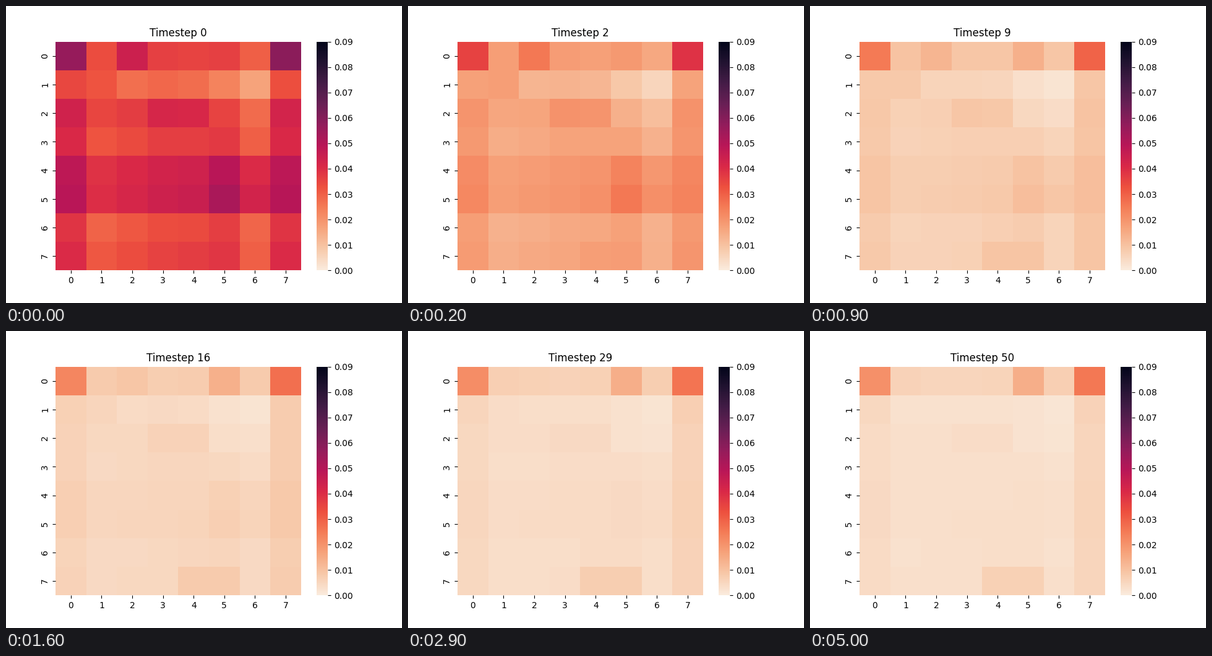
These frames come from a looping animation (640x480 px, 5100 ms). A matplotlib script:

```python
import numpy as np
import matplotlib.pyplot as plt
from matplotlib.animation import FuncAnimation
from matplotlib.colors import LinearSegmentedColormap

SIZE = 8
STEPS = 51
INTERVAL = 100
VMAX = 0.09

# Evenly spaced ramp: cream, orange, red, purple, near black
RAMP = ["#FAEBDD", "#F7C9AA", "#F6A47C", "#F47D57", "#ED503E", "#D92847",
        "#B91657", "#921C5B", "#691F55", "#451C47", "#221331", "#03051A"]

# Values are in thousandths: a level for each row, an offset for each column
ROW_LEVEL = [35.5, 28, 38.5, 36, 43, 44, 33.5, 35.5]
COL_OFFSET = [5, -4, -2, 0, 0, 1.5, -5.5, 5]

# Local bumps and dips: row, column, radius, first height, last height
SPOTS = [
    (0, 0, 0.6, 16, 14),
    (0, 2, 0.6, 11, 0),
    (0, 5, 0.6, 0, 9),
    (0, 7, 0.6, 18, 17.5),
    (1, 1, 0.6, 8, 0),
    (1.4, 5.5, 1, -9, -1.5),
    (2, 3.5, 0.7, 6, 1),
    (4.7, 5.3, 1, 8, 0),
    (7, 4.5, 0.7, 2, 6),
]

rows, cols = np.mgrid[:SIZE, :SIZE]
start = np.add.outer(ROW_LEVEL, COL_OFFSET)

# What remains after the decay is a little higher along three edges
rest = 2 + 2.5 * (rows == 0) + 1.0 * (cols == 0) + 2.5 * (cols == SIZE - 1)


def grid_at(step):
    """Hyperbolic decay of the whole grid plus slowly fading spots."""
    grid = rest + (start - rest) / (1 + 0.7 * step)
    fade = np.exp(-step / 10)
    for row, col, radius, first, last in SPOTS:
        height = last + (first - last) * fade
        dist2 = (rows - row) ** 2 + (cols - col) ** 2
        grid += height * np.exp(-dist2 / radius ** 2)
    return np.maximum(grid, 0.5) / 1000


cmap = LinearSegmentedColormap.from_list("ember", RAMP)
fig, ax = plt.subplots(figsize=(6.4, 4.8), dpi=100)
mesh = ax.pcolormesh(grid_at(0), cmap=cmap, vmin=0, vmax=VMAX)
ax.invert_yaxis()
ax.spines[:].set_visible(False)
centres = np.arange(SIZE) + 0.5
ax.set_xticks(centres, range(SIZE))
ax.set_yticks(centres, range(SIZE), rotation=90, va="center")

bar = fig.colorbar(mesh, ax=ax, ticks=np.linspace(0, VMAX, 10), format="%.2f")
bar.outline.set_linewidth(0)
title = ax.set_title("Timestep 0")


def update(step):
    mesh.set_array(grid_at(step))
    title.set_text(f"Timestep {step}")
    return mesh, title


anim = FuncAnimation(fig, update, frames=STEPS, interval=INTERVAL, repeat=True)
plt.show()
```
